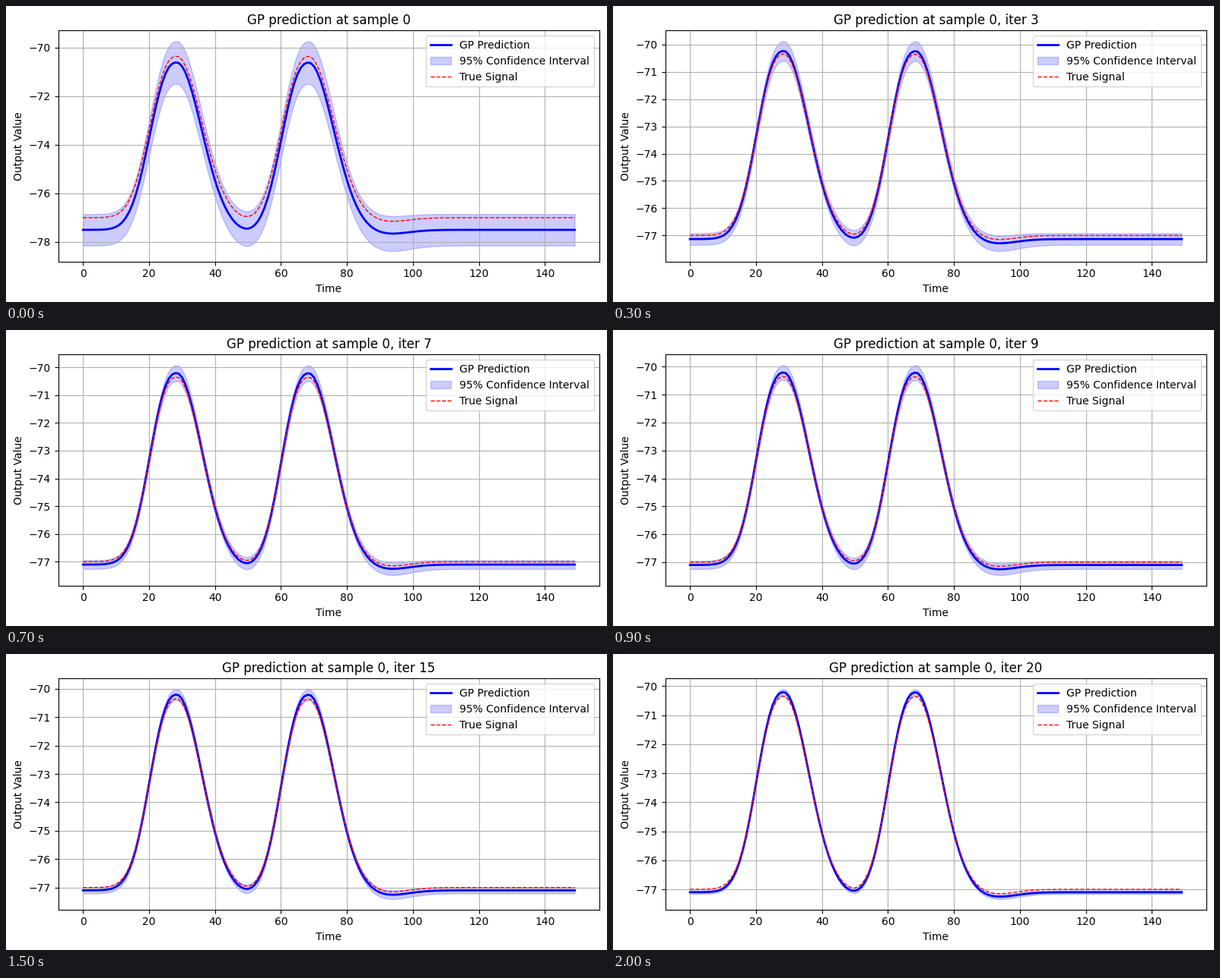
Write a matplotlib script that moves like this. It is 790 px wide and 390 px high and loops after 2100 ms.

```python
import numpy as np
import matplotlib.pyplot as plt
from matplotlib.animation import FuncAnimation

W, H, DPI = 790, 390, 100
FRAMES, INTERVAL = 21, 100
REST, GAIN = -77.0, 1.037

t = np.arange(150)


def bump(x, center, width):
    return np.exp(-0.5 * ((x - center) / width) ** 2)


def pulse(x):
    """Single response: steep onset, Gaussian fall and a slight undershoot."""
    d = x - 28.4
    rise = np.exp(-np.log(2) * (np.abs(d) / 8.85) ** 2.4)
    fall = bump(d, 0, 7.5)
    return 6.65 * np.where(d < 0, rise, fall) - 0.18 * bump(x, 51.5, 6.6)


def learned(k):
    """Share of the initial error left: it vanishes in a few iterations."""
    return np.exp(-0.85 * k)


def ci_width(k, first, late):
    """Half-width that drops quickly from first, then shrinks slowly."""
    return late * np.sqrt(1 - k / 22) + (first - late) * learned(k)


response = pulse(t) + pulse(t - 40)
true = REST + response
peaks = bump(t, 28.4, 6) + bump(t, 68.4, 6)
dips = 0.92 * bump(t, 49.5, 5) + bump(t, 93, 7)

fig = plt.figure(figsize=(W / DPI, H / DPI), dpi=DPI, facecolor="white")
left, right, top, bottom = 68.85, 779.85, 32.4, 336.7
ax = fig.add_axes([left / W, 1 - bottom / H, (right - left) / W, (bottom - top) / H])


def draw(k):
    mean = REST - 0.1 - 0.4 * learned(k) + GAIN * response
    rest = ci_width(k, 0.65, 0.19)
    peak = ci_width(k, 0.88, 0.345)
    dip = ci_width(k, 0.72, 0.27)
    half = rest + (peak - rest) * peaks + (dip - rest) * dips

    ax.clear()
    ax.plot(t, mean, color="blue", lw=2, label="GP Prediction")
    ax.fill_between(t, mean - half, mean + half, color="blue", alpha=0.2,
                    label="95% Confidence Interval")
    ax.plot(t, true, "r--", lw=1, label="True Signal")
    ax.set_title("GP prediction at sample 0" + (f", iter {k}" if k else ""))
    ax.set_xlabel("Time")
    ax.set_ylabel("Output Value")
    ax.grid(True)
    ax.legend(loc="upper right")
    return ax.get_children()


anim = FuncAnimation(fig, draw, frames=FRAMES, init_func=lambda: draw(0),
                     interval=INTERVAL, repeat=True, repeat_delay=0)
plt.show()
```
